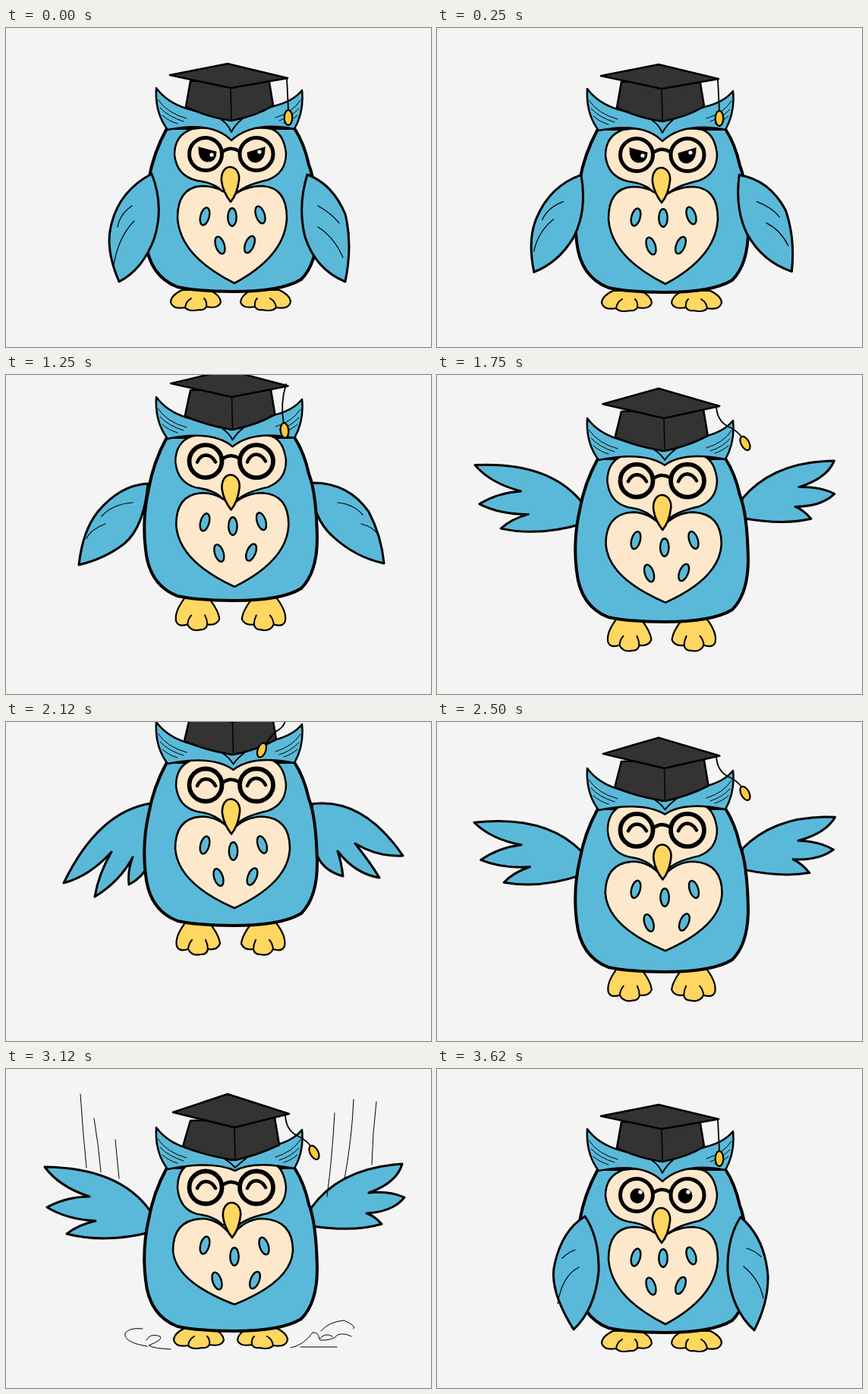
Animation, 560 px wide and 420 px high, one loop 3.75 s. Source, as an HTML page:

```html
<!DOCTYPE html>
<html lang="en">
<head>
<meta charset="utf-8">
<title>Owl</title>
<style>
html, body { margin: 0; width: 100%; height: 100%; overflow: hidden; background: #f4f4f4; }
svg { display: block; width: 100vw; height: 100vh; }
</style>
</head>
<body>
<svg id="stage" viewBox="0 0 560 420" stroke-linecap="round" stroke-linejoin="round"></svg>
<script>
const BLUE = '#5ab9d9', CREAM = '#fde8cb', YELLOW = '#ffd65f', CAP = '#333334', BEAD = '#ffc93c';
const LOOP = 3750;

// Wing drawings: outline of both wings | feather lines
const wings = {
  rest: 'M192 192Q148 215 138 262Q131 292 149 334Q180 318 195 278Q209 235 192 192ZM397 193Q430 205 447 245Q457 285 447 334Q408 318 394 275Q384 235 397 193Z|M166 234Q150 245 147 262M169 254Q148 275 142 312M411 234Q430 245 439 257M411 262Q432 275 444 302',
  hug: 'M195 194Q165 212 155 257Q147 290 180 343Q208 317 213 267Q214 222 195 194ZM400 195Q432 222 436 272Q437 307 418 344Q388 317 383 267Q382 222 400 195Z|M182 238Q172 242 165 249M187 261Q165 272 159 309M408 236Q418 239 427 247M404 260Q425 277 430 302',
  half: 'M187 193Q150 195 121 230Q101 255 96 300Q130 292 156 272Q182 250 187 193ZM400 192Q450 190 478 230Q495 263 498 298Q460 290 430 262Q405 240 400 192Z|M167 218Q140 220 126 236M131 246Q112 253 106 265M437 218Q458 220 470 234M468 246Q484 250 491 261',
  down: 'M192 186Q122 196 76 291Q110 282 139 250Q122 279 117 309Q150 289 167 257Q160 274 162 293Q180 284 190 264ZM403 187Q470 178 523 255Q490 257 460 239Q480 264 492 284Q460 279 437 249Q442 264 444 282Q415 274 408 249Z|',
  flat: 'M194 188Q120 171 41 227Q75 233 115 219Q88 236 73 262Q110 256 140 236Q125 251 121 270Q165 261 192 229ZM402 186Q470 171 535 208Q500 216 468 211Q495 226 512 246Q475 243 445 226Q465 241 474 259Q430 246 406 226Z|',
  up: 'M190 189Q150 132 51 131Q70 157 110 170Q80 170 54 184Q80 200 118 202Q95 207 80 219Q130 232 190 217ZM402 185Q440 132 522 127Q515 152 478 165Q505 162 525 171Q510 190 475 192Q485 195 495 206Q460 217 404 209Z|'
};

// Tassel: string, then bead position and tilt
const tassels = {
  still: ['M370 66L372 108', 372, 118, 0],
  inward: ['M368 66Q368 78 352 86Q342 90 333 95', 325, 100, 50],
  bent: ['M369 62Q361 88 366 114', 367, 123, -5],
  tucked: ['M368 75Q368 85 355 92Q347 100 342 108', 337, 116, 20],
  outward: ['M368 61Q368 82 384 90Q395 95 401 103', 406, 112, -28]
};

const fall = 'M98 33Q101 80 106 130M116 65Q122 100 125 136M144 93L149 144M433 58Q430 115 423 168M458 40Q456 90 446 145M488 43Q483 85 482 126';
const effects = {
  jump: 'M183 322Q190 350 193 381M194 319Q203 345 202 376M226 328L235 378M277 356V386M291 357V384M369 323L366 375M398 318Q393 350 387 383M407 316Q399 345 398 374',
  arcs: 'M63 143Q85 85 136 53M97 125Q120 82 172 58M137 124Q150 98 175 82M443 44Q490 70 512 123M423 65Q450 80 466 116M415 88Q428 100 434 114',
  fall,
  land: fall + 'M217 369Q195 368 188 364Q208 356 203 352Q190 347 185 357M186 365Q155 360 157 348Q162 340 180 342M375 367Q392 364 404 347Q412 346 413 356Q420 346 430 352M388 366H436M415 345Q425 333 445 331Q462 338 458 342M414 357Q430 358 437 350Q445 347 455 352'
};

// start, lift, wings (from, to, amount), eyes, stretch, tassel, effect, effect shift
const poses = [
  [0, 0, 'rest', 'half', 0, 'sly', 0, 'still'],
  [250, 1, 'rest', 'half', .4, 'sly', 0, 'still'],
  [500, 0, 'rest', 'half', 1.15, 'sly', 0, 'still'],
  [620, -27, 'hug', 'hug', 0, 'glare', 0, 'inward', 'jump', 0],
  [870, -42, 'hug', 'hug', 0, 'glare', 0, 'inward', 'jump', 4],
  [1120, -50, 'hug', 'half', .6, 'happy', .2, 'bent', 'jump', 6],
  [1250, -50, 'half', 'half', 0, 'happy', .3, 'bent'],
  [1500, -48, 'flat', 'up', -.1, 'happy', .4, 'bent'],
  [1750, -22, 'flat', 'up', .9, 'happy', .6, 'outward'],
  [1870, -48, 'flat', 'up', 0, 'happy', .6, 'outward'],
  [2120, -79, 'down', 'flat', 0, 'happy', .5, 'tucked'],
  [2370, -50, 'down', 'flat', .8, 'happy', .6, 'bent'],
  [2500, -18, 'flat', 'up', .8, 'happy', .7, 'outward'],
  [2750, -51, 'flat', 'up', 0, 'happy', .8, 'outward', 'arcs', 0],
  [3000, -30, 'flat', 'up', .7, 'happy', .9, 'outward', 'fall', -8],
  [3120, -2, 'up', 'up', 0, 'happy', 1, 'outward', 'land', 0],
  [3370, 0, 'rest', 'half', 1.4, 'happy', .3, 'bent'],
  [3620, 0, 'hug', 'hug', 0, 'open', 0, 'still']
];

const path = (d, fill = 'none', width = 2.5) =>
  `<path d="${d}" fill="${fill}" stroke="#000" stroke-width="${width}"/>`;
const oval = (x, y, rx, ry, fill, width = 0, tilt = 0) =>
  `<ellipse cx="${x}" cy="${y}" rx="${rx}" ry="${ry}" fill="${fill}" stroke="#000" stroke-width="${width}" transform="rotate(${tilt} ${x} ${y})"/>`;
const shift = (x, y, content) => `<g transform="translate(${x} ${y})">${content}</g>`;
const mirrored = content => content + `<g transform="matrix(-1 0 0 1 592 0)">${content}</g>`;

function blend(a, b, amount) {
  const target = b.match(/\d+/g);
  let i = 0;
  return a.replace(/\d+/g, n => (+n + (target[i++] - n) * amount).toFixed(1));
}

function drawWings(from, to, amount) {
  const [outline, feathers] = blend(wings[from], wings[to], amount).split('|');
  return path(outline, BLUE, 3) + path(feathers, 'none', 1.2);
}

function drawFeet(hanging, k) {
  const foot = hanging
    ? path('M236 342Q220 362 223 375Q226 383 238 379Q243 389 255 386Q263 386 264 379Q276 381 280 372Q279 360 264 342Z', YELLOW, 2.2) +
      path('M238 379Q239 371 243 367M264 379Q264 373 261 367', 'none', 2)
    : path('M232 345Q217 352 217 361Q220 371 236 368Q241 374 254 371Q261 372 264 367Q280 370 283 361Q282 351 268 345Z', YELLOW, 2.2) +
      path('M236 368Q237 360 244 356M264 367Q265 360 261 356', 'none', 2);
  return mirrored(shift(4 * k, -2 * k, foot));
}

function drawChest(k) {
  const left = 226 - 6 * k, right = 370 + 8 * k, tip = 336 - 24 * k, side = 250 - 9 * k, top = 208 - 9 * k;
  const heart = `M297 222Q280 ${top} 258 ${top}Q${left} ${top + 2} ${left} ${side}Q${left + 3} ${side + 50 - 9 * k} 301 ${tip}` +
    `Q${right - 2} ${side + 50 - 9 * k} ${right} ${side}Q${right} ${top + 2} 338 ${top}Q315 ${top} 297 222Z`;
  const seeds = [[262, 248 - 14 * k, 15], [298 + 3 * k, 249, 0], [335 + 5 * k, 246 - 11 * k, -18],
    [282 - 4 * k, 286 - 5 * k, -18], [321 + 7 * k, 285 - 5 * k, 22]];
  return path(heart, CREAM, 2.6) + seeds.map(([x, y, tilt]) => oval(x, y, 5.7, 11.8, BLUE, 2.4, tilt)).join('');
}

const eyes = {
  sly: path('M254 157L277 163Q277 177 264 176Q253 174 254 157ZM341 157L318 164Q318 177 330 177Q342 174 341 157Z', '#000', 1) +
    oval(271, 167, 2.6, 2.6, '#fff') + oval(334, 163, 2.6, 2.6, '#fff'),
  open: [264, 327].map(x => oval(x, 167, 9.5, 10, '#000') + oval(x + 4, 162, 2.7, 2.7, '#fff')).join(''),
  happy: path('M252 167Q256 158 264 158Q272 159 276 167M318 167Q322 157 330 157Q338 158 342 166', 'none', 4.5),
  glare: path('M252 170L270 153M251 179L279 160M263 185L281 170M318 175L336 155M321 182L347 158', 'none', 1.3)
};
const sparkle = path('M344 136Q345 146 354 150Q346 152 341 159Q340 151 333 147Q341 145 344 136Z', '#fff', 1.5);

function drawFace(mood, lift, k) {
  const lens = mood === 'glare' ? '#eff1f3' : 'none';
  const rim = mood === 'sly' || mood === 'open' ? 5 : 5.8;
  const left = 222 + 4 * k;
  return path(`M297 140Q270 128 245 133Q${left} 141 ${left} 167Q${left + 3} 195 252 201Q275 204 285 215H307Q318 206 345 200Q369 191 369 165Q366 139 350 133Q325 128 297 140Z`, CREAM) +
    oval(263, 166, 21.5, 21.5, lens, rim) + oval(330, 166, 22, 21.5, lens, rim) +
    path('M285 163Q296 155 307 162', 'none', 4.5) + eyes[mood] +
    (mood === 'glare' && lift > -40 ? sparkle : '');
}

const beak = path('M295 183C303 183 308 191 307 200Q305 218 296 229Q286 216 284 202C283 191 288 183 295 183Z', YELLOW, 2.6);

function drawBrow(k) {
  const x = 297 + 5 * k, y = 148 - 12 * k;
  return path(`M198 79Q212 98 238 106L297 122L352 103Q378 97 390 82Q393 110 380 133Q325 122 ${x} ${y}Q272 122 213 134Q196 112 198 79Z`, BLUE) +
    path(`M${x - 13} 121Q${x - 5} 126 ${x} ${137 - 5 * k}Q${x + 5} 127 ${x + 14} 120`, 'none', 2) +
    path('M200 94Q212 112 238 119M203 105Q214 117 234 123M206 115Q215 123 226 126M388 95Q378 111 355 118M386 106Q376 117 360 122M384 115Q376 122 366 125', 'none', 1);
}

function drawCap(k, [string, x, y, tilt]) {
  const front = 296 + 5 * k;
  return path(`M243 70L${237 - 4 * k} 104Q265 117 ${front + 1} 122Q330 116 ${352 + 8 * k} 102L${346 + 8 * k} 66Z`, CAP, 2.6) +
    path(`M${front} 79L${front + 1} 120`, 'none', 1.5) +
    path(`M${216 + 4 * k} ${62 - 3 * k}L292 ${47 - 12 * k}L${371 + 2 * k} ${66 - 5 * k}L${front} 79Z`, CAP) +
    path(string, 'none', 1.8) + oval(x, y, 5.3, 9.8, BEAD, 2.2, tilt);
}

const body = path('M212 132Q194 165 188 200Q179 240 184 280C187 310 200 331 226 341Q255 347 300 347C340 347 371 342 389 331Q410 310 410 265Q409 205 399 180Q393 152 380 132Z', BLUE, 4);

function drawPose([start, lift, from, to, amount, mood, k, tassel, effect, drop]) {
  const wing = drawWings(from, to, amount);
  const folded = (from === 'rest' || from === 'hug') && amount < .5;
  const owl = drawFeet(lift < -10, k) + (folded ? '' : wing) + body + drawChest(k) + (folded ? wing : '') +
    shift(0, -8 * k, drawFace(mood, lift, k)) + shift(2 * k, -5 * k, beak) +
    drawBrow(k) + drawCap(k, tassels[tassel]);
  return shift(0, lift, owl) + (effect ? shift(0, drop, path(effects[effect], 'none', 1)) : '');
}

const stage = document.getElementById('stage');
const begin = performance.now();
let shown;

function tick() {
  const time = (performance.now() - begin) % LOOP;
  const pose = poses.findLast(p => p[0] <= time);
  if (pose !== shown) {
    shown = pose;
    stage.innerHTML = drawPose(pose);
  }
  requestAnimationFrame(tick);
}
tick();
</script>
</body>
</html>
```
